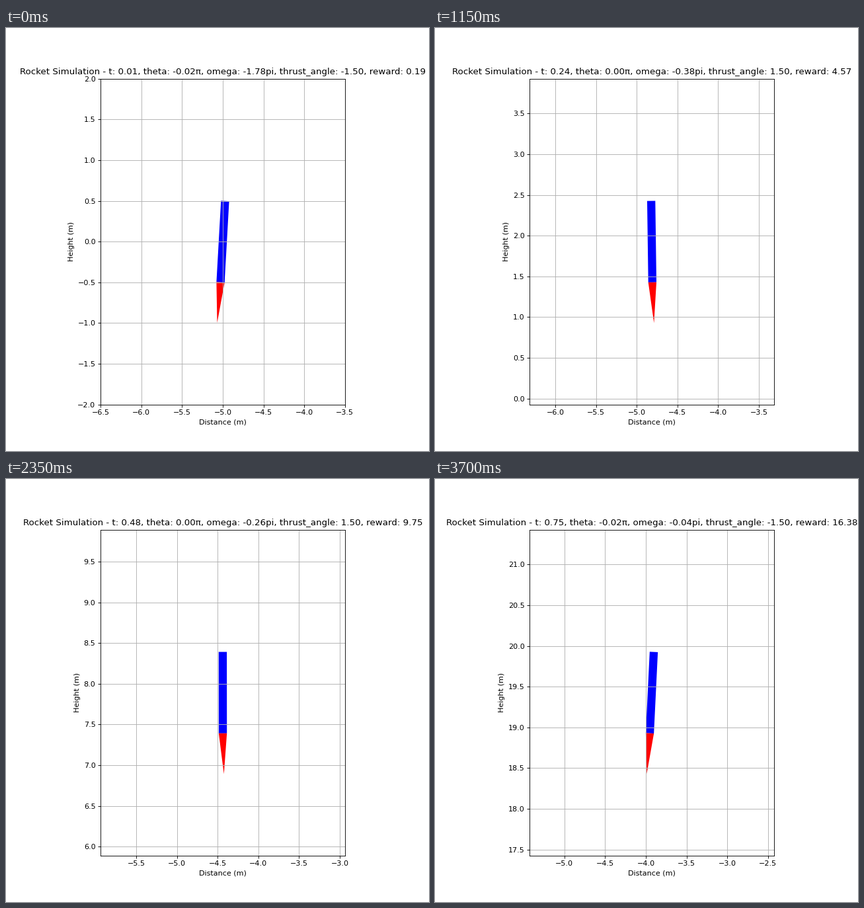
Animation of 640 by 640 pixels, one loop 3.75 s. Source, as a matplotlib script:

```python
import numpy as np
import matplotlib.pyplot as plt
from matplotlib.animation import FuncAnimation
from matplotlib.patches import Polygon

DT = 0.01
FRAMES = 75
LENGTH, WIDTH, FLAME = 1.0, 0.1, 0.5

# time, tilt (pi rad), spin (pi rad/s), thrust angle (deg), total reward
KEYS = np.array([
    (0.01, -0.0178, -1.78, -1.5, 0.19),
    (0.17, 0.0022, 0.67, 3.0, 3.11),
    (0.30, -0.0180, -0.20, -1.5, 5.83),
    (0.40, 0.0022, 0.36, 1.5, 7.95),
    (0.56, -0.0145, 0.04, -1.5, 11.56),
    (0.66, 0.0042, -0.04, 1.5, 14.23),
    (0.75, -0.0155, -0.04, -1.5, 16.38),
])


def position(t):
    """Centre of the rocket: steady climb, sideways drift after an early push."""
    y = (t - DT) * (35.05 * t - 0.035)
    if t < 0.17:
        drift = 0.089 * ((t - DT) / 0.16) ** 2.4
    else:
        s = t - 0.3
        drift = 0.273 + 1.5 * s + 0.62 * s * s
    return -5 + drift, y


def attitude(t):
    """Tilt, spin and thrust angle from cubic Hermite segments."""
    i = int(np.clip(np.searchsorted(KEYS[:, 0], t + 1e-6) - 1, 0, len(KEYS) - 2))
    (t0, p0, v0), (t1, p1, v1) = KEYS[i, :3], KEYS[i + 1, :3]
    h = t1 - t0
    s = (t - t0) / h
    rise = p1 - p0
    b = 3 * rise - h * (2 * v0 + v1)
    a = h * (v0 + v1) - 2 * rise
    theta = p0 + s * (h * v0 + s * (b + s * a))
    omega = v0 + s * (2 * b + 3 * a * s) / h
    accel = (2 * b + 6 * a * s) / h ** 2

    near = np.abs(KEYS[:, 0] - t) < DT / 2
    if near.any():
        thrust = KEYS[near, 3][0]
    else:
        # each 1.5 degrees of gimbal changes the spin by 0.04 pi per step
        thrust = 1.5 * round(-accel * DT / 0.04)
    return theta, omega, thrust


def rocket_shapes(x, y, tilt, gimbal):
    """Corner points of the body and of the flame."""
    c, s = np.cos(tilt), np.sin(tilt)
    w, h = WIDTH / 2, LENGTH / 2
    corners = np.array([(-w, -h), (w, -h), (w, h), (-w, h)])
    hull = corners @ np.array([(c, s), (-s, c)]) + (x, y)
    a = tilt + gimbal
    tip = hull[:2].mean(axis=0) + FLAME * np.array((np.sin(a), -np.cos(a)))
    return hull, np.vstack([hull[:2], tip])


fig, ax = plt.subplots(figsize=(8, 8), dpi=80)
ax.set_aspect("equal")
ax.set_xlabel("Distance (m)")
ax.set_ylabel("Height (m)")
ax.grid(True)
body = ax.add_patch(Polygon(np.zeros((4, 2)), facecolor="blue"))
flame = ax.add_patch(Polygon(np.zeros((3, 2)), facecolor="red"))


def update(frame):
    t = (frame + 1) * DT
    x, y = position(t)
    theta, omega, thrust = attitude(t)
    reward = np.interp(t, KEYS[:, 0], KEYS[:, 4])

    hull, jet = rocket_shapes(x, y, theta * np.pi, np.radians(thrust))
    body.set_xy(hull)
    flame.set_xy(jet)
    ax.set_xlim(x - 1.5, x + 1.5)
    ax.set_ylim(y - 2, y + 2)
    ax.set_title(
        f"Rocket Simulation - t: {t:.2f}, theta: {theta:.2f}π, "
        f"omega: {omega:.2f}pi, thrust_angle: {thrust:.2f}, reward: {reward:.2f}"
    )
    return body, flame


anim = FuncAnimation(fig, update, frames=FRAMES, interval=50, repeat=True)
plt.show()
```
